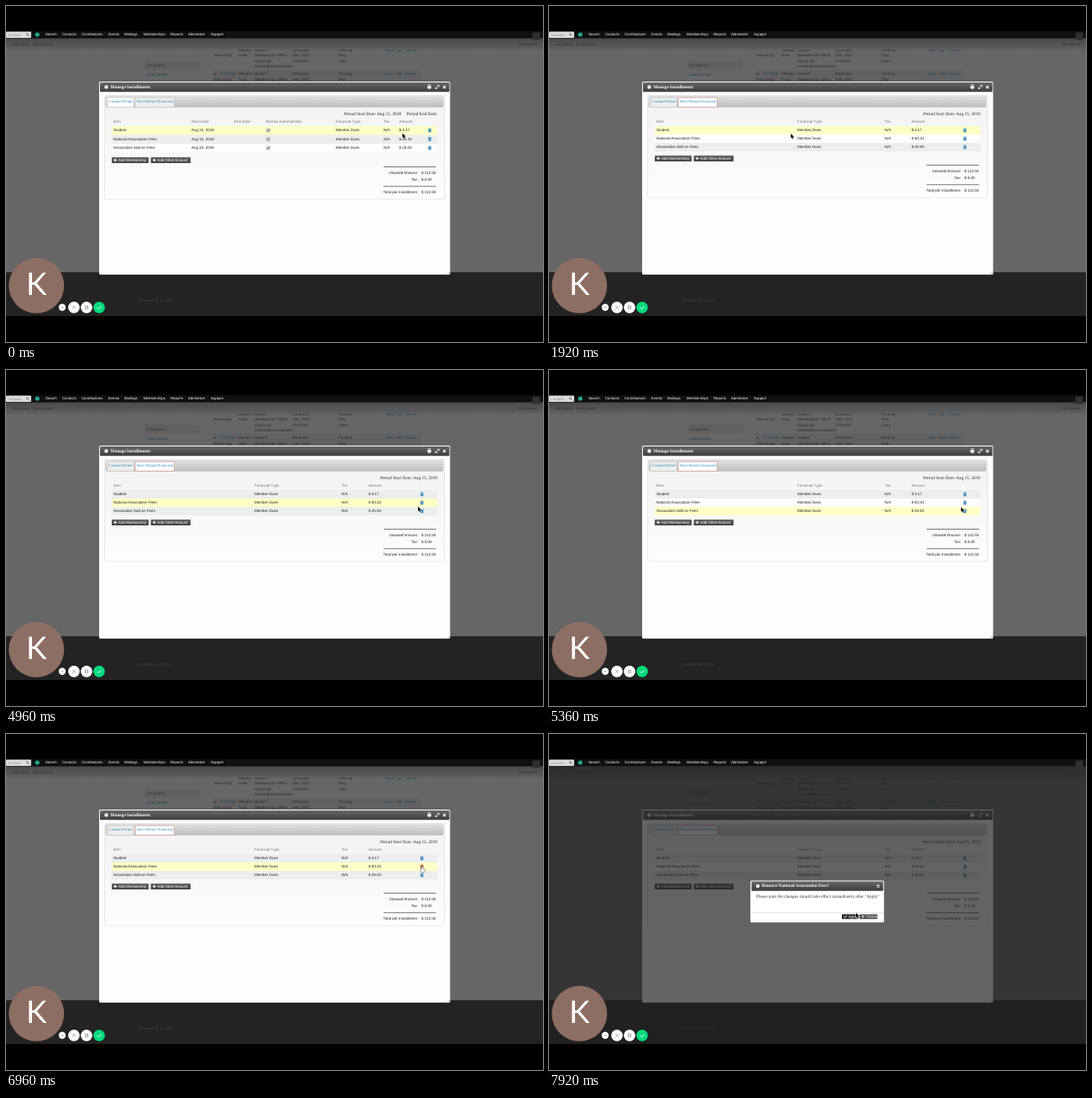
Animation, 640 px wide and 400 px high, one loop 8000 ms. Source, as an HTML page with a canvas:

```html
<!DOCTYPE html>
<html lang="en">
<head>
<meta charset="utf-8">
<title>Manage Installments</title>
<style>
html, body { margin: 0; width: 100%; height: 100%; overflow: hidden; background: #000; }
canvas { display: block; }
</style>
</head>
<body>
<canvas width="640" height="400"></canvas>
<script>
const ctx = document.querySelector('canvas').getContext('2d');
const LOOP = 8000, TAB_SWITCH = 1200, MODAL_OPEN = 7120;
const SANS = '"Liberation Sans", Arial, sans-serif';
const SERIF = '"Liberation Serif", "Times New Roman", serif';
const LINK = '#2385bd';

// time, x, y of the pointer tip
const path = [
  [0, 472.5, 151.5], [320, 472.5, 151.5], [1120, 178, 113], [1680, 178, 113],
  [1920, 288, 152], [2000, 305, 152.5], [2160, 305, 152.5], [2640, 488, 156],
  [3200, 494, 158], [3440, 495, 155.5], [4880, 495, 155.5], [4960, 491, 162.5],
  [5200, 488, 169], [5680, 497, 151.5], [5920, 497.5, 152.5], [6160, 496, 156],
  [6400, 496, 156], [6640, 496, 158], [7360, 496, 158], [7440, 478, 166],
  [7600, 380, 196], [7760, 372, 208], [7920, 366, 213], [LOOP, 366, 213]
];

function pointerAt(t) {
  const i = path.findIndex(p => p[0] > t);
  const [t0, x0, y0] = path[i - 1], [t1, x1, y1] = path[i];
  const u = (t - t0) / (t1 - t0);
  return { x: x0 + (x1 - x0) * u, y: y0 + (y1 - y0) * u };
}

function box(x, y, w, h, fill, radius = 0, stroke) {
  ctx.beginPath();
  ctx.roundRect(x, y, w, h, radius);
  if (fill) { ctx.fillStyle = fill; ctx.fill(); }
  if (stroke) { ctx.strokeStyle = stroke; ctx.lineWidth = .6; ctx.stroke(); }
}

function shade(y0, y1, from, to) {
  const g = ctx.createLinearGradient(0, y0, 0, y1);
  g.addColorStop(0, from);
  g.addColorStop(1, to);
  return g;
}

function text(s, x, y, color = '#333', size = 4.5, family = SANS, align = 'left', weight = '') {
  ctx.font = `${weight} ${size}px ${family}`;
  ctx.textAlign = align;
  ctx.fillStyle = color;
  ctx.fillText(s, x, y);
}

const serif = (s, x, y, color, size, align, weight) => text(s, x, y, color, size, SERIF, align, weight);

function dot(x, y, r, color) {
  ctx.beginPath();
  ctx.arc(x, y, r, 0, 7);
  ctx.fillStyle = color;
  ctx.fill();
}

// strokes an SVG path with its own origin
function stroke(d, x, y, color, width = .8) {
  ctx.save();
  ctx.translate(x, y);
  ctx.strokeStyle = color;
  ctx.lineWidth = width;
  ctx.stroke(new Path2D(d));
  ctx.restore();
}

const cross = (x, y, r, color, width) =>
  stroke(`M${-r} ${-r}L${r} ${r}M${r} ${-r}L${-r} ${r}`, x, y, color, width);

function page() {
  box(0, 0, 640, 400, '#000');
  box(0, 39, 640, 278, '#666');
  box(0, 38, 640, 14, shade(38, 52, '#484848', '#606060'));
  box(0, 317, 640, 52, '#232323');
  text('Add patient', 7, 45.5, '#303030', 4.2);
  text('Quick patient', 32, 45.5, '#303030', 4.2);
  text('Edit dataset', 633, 45.5, '#303030', 4.2, SANS, 'right');
  text('Powered by Drupal', 158, 351, '#444', 4.6);

  ctx.save();
  ctx.beginPath();
  ctx.rect(0, 52, 640, 38);
  ctx.clip();
  box(165, 65, 66, 10.5, '#61605e');
  serif('Navigation', 167, 70.5, '#303030', 5.2);
  text('▸ Add contact', 167, 82, '#1c4257', 4.3);
  box(245, 76, 250, 13, '#616161');
  const columns = [
    [247, '', '(Recurring)'], [277, 'Member', 'Dues'],
    [296, 'Student', 'Membership: Offline', 'signup (by', 'sample@mail.example)'],
    [341, 'December', '10th, 2015', '12:00 AM'], [396, 'Pending', '(Pay', 'Later)']
  ];
  for (const [x, ...lines] of columns)
    lines.forEach((s, i) => {
      text(s, x, 52.5 + i * 6.4, '#2a2a2a', 4.4);
      if (i < 2) text(s, x, 81 + i * 6.4, '#2a2a2a', 4.4);
    });
  text('▸', 248, 81, '#222');
  text('$ 112.50', 256, 81, '#1c4257');
  for (const y of [52.5, 81]) {
    text('View', 452, y, '#1c4257', 4.3);
    text('Edit', 465, y, '#1c4257', 4.3);
    text('more ▸', 476, y, '#1c4257', 4.3);
  }
  ctx.restore();
}

function menu() {
  box(0, 30, 640, 8.5, '#101010');
  box(0, 30.5, 30, 7.5, '#ddd', 1);
  text('Contacts', 2, 34.5, '#888', 4.2);
  dot(25.5, 33.7, 1.5, '#777');
  dot(25.5, 33.7, .8, '#ddd');
  stroke('M0 0L1.8 1.8', 26.4, 34.7, '#777', .8);
  dot(37.3, 34, 2.6, '#27a58c');
  const items = { Search: 47, Contacts: 67, Contributions: 90, Events: 122, Mailings: 141,
    Memberships: 164, Reports: 196, Administer: 217, Support: 244 };
  for (const name in items) text(name, items[name], 34, '#fff', 4.3);
  box(627.5, 31.5, 9, 9, '#303030', 1);
}

function titleBar(x, y, w, title) {
  box(x, y, w, 11.2, shade(y, y + 11.2, '#686868', '#3d3d3d'), 1);
  dot(x + 7.5, y + 5.5, 2.2, '#eee');
  serif(title, x + 12.5, y + 5.6, '#fff', 5.3, 'left', 'bold');
  cross(x + w - 6, y + 5.6, 1.4, '#fff', 1.1);
}

function button(label, x, y, w, h, hot) {
  box(x, y - h / 2, w, h, hot ? '#302b28' : shade(y - h / 2, y + h / 2, '#686868', '#404040'), .8);
  text(label, x + 8, y, '#fff', 4.35);
}

function trash(x, y, color) {
  box(x - 1.6, y - 1.4, 3.2, 3.7, color, .4);
  box(x - 1.9, y - 2.3, 3.8, .7, color);
  box(x - .4, y - .5, .8, 2, '#b4d3e6');
}

function tab(label, x, w, active, outline) {
  box(x, 109, w, 11.3, active ? '#fff' : '#eee', [1.5, 1.5, 0, 0], outline || '#c4c4c4');
  serif(label, x + 1.7, 114, LINK, 4.8);
}

function installments(next, hoverRow, onIcon) {
  box(111, 90, 418.3, 229.8, '#fdfdfd', 1.5);
  titleBar(112, 91, 416.5, 'Manage Installments');
  box(502.4, 95.3, 4.2, 2.6, '#fff', .4);
  box(503.2, 93.6, 2.6, 5.2, null, 0, '#fff');
  stroke('M-2 2L2 -2M0 -2H2V0M-2 0V2H0', 514, 96.5, '#fff', .8);
  stroke('M0 3L3 0M1.6 3L3 1.6', 525.5, 316, '#888', .5);

  const shift = next ? -2 : 0;
  box(117.5, 106.5, 405, 123.5 + shift, shade(106, 229, '#f2f2f2', '#fdfdfd'), 2, '#d8d8d8');
  box(119, 108, 402, 12.5, shade(108, 120, '#dfdfdf', '#bebebe'), 2, '#c8c8c8');
  tab('Current Period', 120.5, 32, !next);
  tab('Next Period (Forecast)', 154, 46.5, next, next && '#cf8580');

  if (next) {
    serif('Period Start Date: Aug 15, 2019', 514, 129, '#222', 5.3, 'right');
  } else {
    serif('Period Start Date: Aug 15, 2018', 403, 129, '#222', 5.3);
    serif('Period End Date:', 514, 129, '#222', 5.3, 'right');
  }

  const col = next ? { type: 296, tax: 400, amount: 432, icon: 495.7 }
                   : { type: 393, tax: 450, amount: 468.5, icon: 505 };
  const head = [['Item', 128], ['Financial Type', col.type], ['Tax', col.tax], ['Amount', col.amount]];
  if (!next) head.push(['Start Date', 221], ['End Date', 272], ['Renew Automatically', 310]);
  for (const [s, x] of head) text(s, x, 138, '#777', 4.6);

  const pitch = next ? 10 : 10.5;
  const rows = [['Student', '4.17'], ['National Association Fees', '83.33'], ['Association Add-on Fees', '25.00']];
  rows.forEach(([name, amount], i) => {
    const top = 143 + i * pitch, y = top + 5;
    const striped = (i % 2 === 0) === next;
    box(126, top, 388, pitch, i === hoverRow ? '#ffffc6' : striped ? '#ebeeed' : '#fdfdfd');
    text(name, 128, y, '#222');
    text('Member Dues', col.type, y, '#222');
    text('N/A', col.tax, y, '#222');
    text('$ ' + amount, col.amount, y, '#222');
    if (!next) {
      text('Aug 15, 2018', 221, y, '#222');
      box(310.5, y - 2, 4, 4, '#eee', .6, '#999');
      stroke('M-1.2 0L-.3 1L1.3 -1.3', 312.5, y, '#222', .8);
    }
    trash(col.icon, y, onIcon && i === hoverRow ? '#8e3528' : '#2a80b9');
  });

  for (const [label, x, w] of [['Add Membership', 126, 44], ['Add Other Amount', 172.5, 47.5]]) {
    button(label, x, 183.5 + shift, w, 7.2);
    stroke('M-1.8 0H1.8M0 -1.8V1.8', x + 4.2, 183.5 + shift, '#fff', 1.1);
  }
  for (const y of [191.5, 214.8]) box(450, y - .5 + shift, 62.5, 1, '#777');
  for (const [label, value, y] of [['Untaxed Amount:', '112.50', 198.5], ['Tax:', '0.00', 206.8],
    ['Total per Installment:', '112.50', 222]]) {
    text(label, 491, y + shift, '#222', 4.5, SANS, 'right');
    text('$ ' + value, 495, y + shift, '#222');
  }
}

function confirmation(applyHot) {
  box(0, 38.5, 640, 330.5, 'rgba(32,32,32,.69)');
  box(240, 174.5, 159.3, 49.8, '#fff', 1.5);
  titleBar(241.3, 175.5, 157, 'Remove National Association Fees?');
  serif('Please note the changes should take effect immediately after "Apply"', 247, 194, '#333', 5.3);
  box(241, 212, 158, .6, '#ccc');
  button('Apply', 349, 217.4, 19.5, 5.8, applyHot);
  button('Cancel', 370, 217.4, 21.5, 5.8);
  stroke('M-1.6 0L-.4 1.3L1.8 -1.5', 353, 217.4, '#fff', .9);
  cross(374, 217.4, 1.3, '#fff', .9);
}

function recorder() {
  dot(36.3, 332.8, 33, '#8d6e63');
  text('K', 36.3, 333.2, '#fff', 37, 'Lato, sans-serif', 'center');
  dot(67, 358.8, 4.2, '#fff');
  stroke('M-1.5 0H1.5', 67, 358.8, '#777', .7);
  dot(81, 358.8, 6.9, '#fff');
  cross(81, 358.8, 1.8, '#888', .7);
  dot(96, 358.8, 6.9, '#fff');
  stroke('M-1.2 -2.5V2.5M1.2 -2.5V2.5', 96, 358.8, '#666', .8);
  dot(111, 358.8, 6.9, '#00d97e');
  stroke('M-2.5 .2L-.8 1.9L2.6 -1.7', 111, 358.8, '#fff', .9);
}

const arrow = new Path2D('M0 0V5.6L1.3 4.5L2.2 6.5L3.2 6.1L2.3 4.1H4Z');
const hand = new Path2D('M-.6 0Q0 -.6 .6 0V2.2L2.9 2.8Q3.5 3 3.3 3.8L2.7 6.2H-.6L-2.2 3.8Q-1.7 3 -.6 4Z');

function pointer({ x, y }, isHand) {
  ctx.save();
  ctx.translate(x, y);
  ctx.strokeStyle = isHand ? '#111' : '#fff';
  ctx.fillStyle = isHand ? '#fff' : '#000';
  ctx.lineWidth = .7;
  const shape = isHand ? hand : arrow;
  ctx.stroke(shape);
  ctx.fill(shape);
  ctx.restore();
}

function draw(now) {
  const t = now % LOOP;
  const p = pointerAt(t), next = t >= TAB_SWITCH, modal = t >= MODAL_OPEN;
  const inTable = !modal && p.x > 126 && p.x < 514 && p.y >= 143;
  const row = inTable ? Math.floor((p.y - 143) / (next ? 10 : 10.5)) : -1;
  const onIcon = next && row >= 0 && Math.abs(p.x - 495.5) < 1.4;
  const onTab = p.x < 201 && p.y > 108 && p.y < 121;

  ctx.textBaseline = 'middle';
  ctx.textRendering = 'geometricPrecision';
  page();
  installments(next, row, onIcon);
  if (modal) confirmation(p.x < 369 && p.y > 212);
  menu();
  recorder();
  pointer(p, onIcon || onTab);
  requestAnimationFrame(draw);
}
requestAnimationFrame(draw);
</script>
</body>
</html>
```
